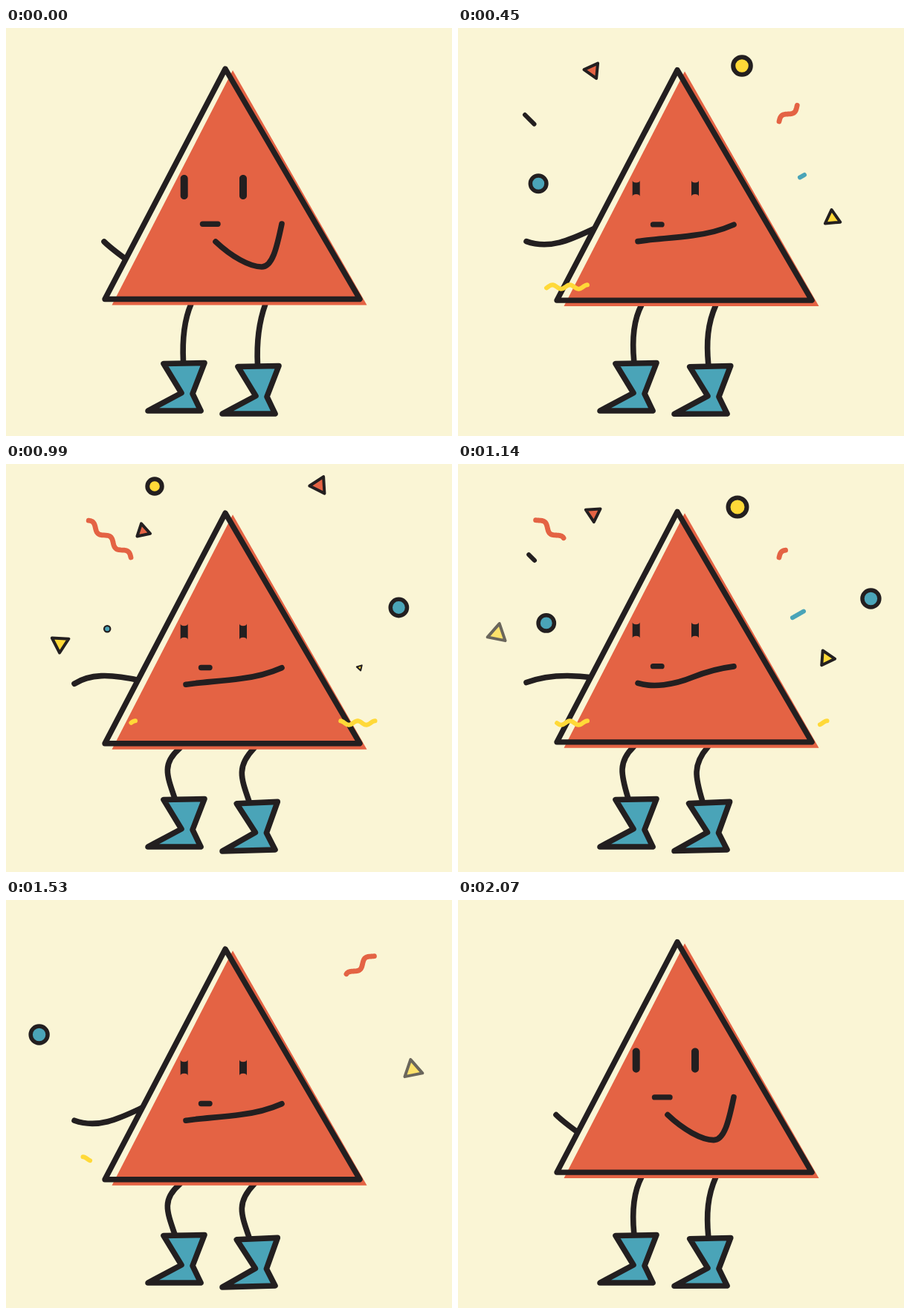
Write an HTML page that moves like this. It is 600 px wide and 550 px high and loops after 2.1 s.

```html
<!DOCTYPE html>
<html lang="en">
<head>
<meta charset="utf-8">
<title>Party triangle</title>
<style>
  html, body { margin: 0; width: 100%; height: 100%; overflow: hidden; background: #faf5d5; }
  svg { display: block; width: 100vw; height: 100vh; }
  path, polygon, polyline { stroke-linecap: round; stroke-linejoin: round; }
  .line { fill: none; stroke: #231f20; stroke-width: 7.6; }
  .shoe { fill: #4aa4b8; stroke: #231f20; stroke-width: 7.6; }
</style>
</head>
<body>
<svg viewBox="0 0 600 550">
  <defs>
    <polygon id="shoe" class="shoe" points="212,452.5 267,451.5 251,493 262,516 191,516 236,492"/>
  </defs>
  <path id="legL" class="line"/>
  <path id="legR" class="line"/>
  <use href="#shoe"/>
  <g id="footR"><use href="#shoe" x="100" y="4"/></g>
  <g id="body">
    <path id="arm" class="line"/>
    <polygon points="295,55 476,365.5 133,365.5" fill="#faf5d5"/>
    <polygon points="305,57 485.5,373.5 142.5,373.5" fill="#e46344"/>
    <polygon class="line" points="295,55 476,365.5 133,365.5" style="stroke-width:7.4"/>
    <path id="eyes" fill="#231f20"/>
    <path id="nose" class="line" style="stroke-width:7.4"/>
    <path id="mouth" class="line"/>
  </g>
  <g id="confetti"></g>
</svg>
<script>
const STEP = 30, STEPS = 70;
const INK = '#231f20', RED = '#e46344', BLUE = '#4aa4b8', YELLOW = '#ffd938';

const el = id => document.getElementById(id);
const clamp = v => Math.min(1, Math.max(0, v));
const smooth = v => { v = clamp(v); return v * v * (3 - 2 * v); };
const lerp = (a, b, k) => a + (b - a) * k;
const mix = (p, q, k) => p.map((v, i) => lerp(v, q[i], k));
const curve = p => `M${p.slice(0, 2)}C${p.slice(2)}`;
const setPath = (id, d) => el(id).setAttribute('d', d);

// Body bob: five dips per loop
function bobAt(n) {
  const phase = (n % 14) / 7;
  const u = phase < 1 ? phase : 2 - phase;
  return 12.7 * Math.sin(Math.PI / 2 * u ** 0.75) ** 2;
}

function drawLegs(bob) {
  const leg = mix([249, 372, 240, 393, 237, 420, 238.5, 450],
                  [234, 383, 211, 403, 216, 418, 227, 450], bob / 11);
  setPath('legL', curve(leg));
  setPath('legR', curve(leg.map((v, i) => i % 2 ? v + (i > 2 ? 4 : 0) : v + 100)));
  el('footR').setAttribute('transform', `rotate(${-bob * 0.136} 361 520)`);
}

function drawFace(n) {
  const party = smooth((n - 2) / 6) * (1 - smooth((n - 56) / 7));
  const angle = 2 * Math.PI * (n - 15) / 36;
  const swing = Math.cos(angle), wave = Math.sin(angle);

  const waving = mix([92, 285, 112, 272, 138, 271, 182, 281],
                     [92, 286, 125, 298, 155, 282, 185, 268], (swing + 1) / 2);
  setPath('arm', curve(mix([132, 288, 140, 296, 150, 304, 180, 325], waving, party)));

  const smile = [282, 288, 303, 308, 328, 322, 344, 322, 358, 322, 364, 298, 371, 264];
  const wobble = [242, 286, 262, 283 - 12 * wave, 290, 281.5 - 9.5 * wave, 316, 278,
                  338, 275.5 + 8.5 * wave, 354, 271 + 7 * wave, 371, 263.5];
  setPath('mouth', curve(mix(smile, wobble, party)));

  const [top, bottom, bulge] = mix([203, 226, 6.7], [204, 225.5, -4], party);
  setPath('eyes', [239.7, 319].map(x => {
    const l = x - 5, r = x + 5;
    return `M${l},${top}C${l},${top - bulge} ${r},${top - bulge} ${r},${top}` +
           `V${bottom}C${r},${bottom + bulge} ${l},${bottom + bulge} ${l},${bottom}Z`;
  }).join(''));

  const [x1, x2, y] = mix([264.5, 285, 264.3], [262.5, 274, 263.3], party);
  setPath('nose', `M${x1},${y}H${x2}`);
}

function disc(x, y, r, width, color, opacity) {
  if (r <= 0 || opacity <= 0) return '';
  return `<circle cx="${x}" cy="${y}" r="${r - width / 2}" fill="${color}" stroke="${INK}"
    stroke-width="${width}" opacity="${opacity}"/>`;
}

function triangle(x, y, r, turn, width, color, opacity) {
  if (r <= 0 || opacity <= 0) return '';
  const points = [0, 120, 240].map(a => {
    const t = (a + turn) * Math.PI / 180;
    return [x + r * Math.cos(t), y + r * Math.sin(t)];
  }).join(' ');
  return `<polygon points="${points}" fill="${color}" stroke="${INK}"
    stroke-width="${width}" opacity="${opacity}"/>`;
}

// Draws the part of a path that lies between tail and head
function streak(at, tail, head, width, color) {
  tail = clamp(tail);
  head = clamp(head);
  if (head <= tail) return '';
  const points = Array.from({ length: 41 }, (_, i) => at(lerp(tail, head, i / 40))).join(' ');
  return `<polyline points="${points}" fill="none" stroke="${color}" stroke-width="${width}"/>`;
}

const dash = (x1, y1, x2, y2) => s => [lerp(x1, x2, s), lerp(y1, y2, s)];
const ribbon = s => [lerp(174, 103.5, s), 349 - 2.7 * Math.cos(6 * Math.PI * s)];
const stairs = s => {
  const off = 3.8 * Math.sin(2 * Math.PI * 2.6 * s);
  return [432 + 62 * s - 0.64 * off, 126 - 52 * s - 0.77 * off];
};

function burst(age, mirrored) {
  if (age < 0 || age > 28) return '';
  const drift = smooth(age / 26);
  const pop = clamp(age / 5);
  const grown = 10 + 0.2 * age;
  const fade = end => clamp((end - age) / 3);
  const bubble = (13 + 0.06 * age) * pop;
  const yellowSize = (15.5 - 0.35 * Math.max(0, age - 7)) * clamp((age - 2.5) / 3);
  const shapes = [
    triangle(185 - 0.42 * age, 100 - 4.75 * age, grown * clamp((age + 1) / 3),
             38.7 - 10.35 * age, 4, RED, fade(20)),
    disc(355 + 3 * age, 82.5 - 3.5 * age, yellowSize, 6 * clamp(yellowSize / 13), YELLOW, fade(18.5)),
    disc(138 - 108 * drift, 223 - 48 * drift, bubble, 5.5 * pop, BLUE, fade(25.5)),
    triangle(468 + 3.95 * age, 279.5 - 2.53 * age, grown * pop,
             -68.2 + 10.35 * age, 4 * clamp(pop + 0.1), YELLOW, fade(22)),
    streak(stairs, (age - 15) / 11, 1 - (1 - clamp((age - 5.8) / 11)) ** 1.5, 6.8, RED),
    streak(ribbon, (age - 11.7) / 9.6, (age - 1.2) / 10, 6, YELLOW),
    streak(dash(446, 209.5, 466, 198), (age - 6.2) / 4, (age - 3.2) / 4, 6, BLUE),
    streak(dash(103, 130, 90, 117), (age - 8.8) / 5.3, (age - 4.6) / 4, 6, INK)
  ].join('');
  return mirrored ? `<g transform="translate(600) scale(-1 1)">${shapes}</g>` : shapes;
}

function render(ms) {
  const n = Math.floor(ms / STEP) % STEPS;
  const bob = bobAt(n);
  el('body').setAttribute('transform', `translate(0 ${bob})`);
  drawLegs(bob);
  drawFace(n);
  el('confetti').innerHTML = burst(n - 6) + burst(n - 18, true) + burst(n - 31);
}

const start = performance.now();
function tick() {
  render(performance.now() - start);
  requestAnimationFrame(tick);
}
tick();
</script>
</body>
</html>
```
